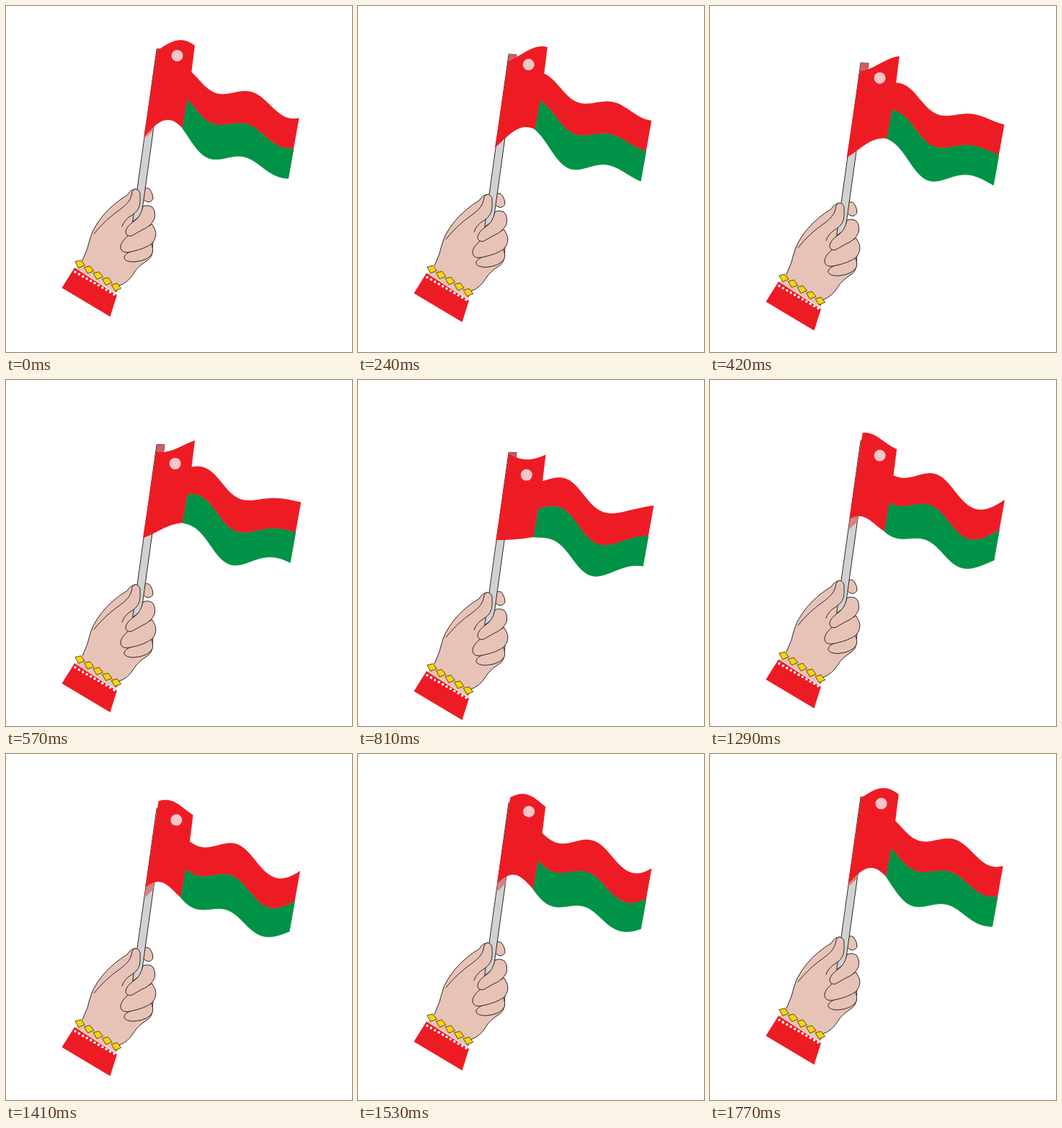
An HTML page that plays this animation: 480 by 480 pixels, repeating every 1.8 s.

```html
<!DOCTYPE html>
<html lang="en">
<head>
<meta charset="utf-8">
<title>Waving flag</title>
<style>
  html, body { margin: 0; width: 100%; height: 100%; overflow: hidden; background: #fff; }
  svg { display: block; width: 100vw; height: 100vh; }
  .line { stroke: #2e2623; stroke-width: 1; stroke-linejoin: round; stroke-linecap: round; }
  .skin { fill: #e7c3b7; }
  .red { fill: #ed1c24; }
</style>
</head>
<body>
<svg viewBox="0 0 480 480">
  <defs>
    <linearGradient id="tint" x1="0" y1="0" x2="0" y2="1">
      <stop offset="0" stop-color="#cf5b60"/>
      <stop offset="1" stop-color="#d98485"/>
    </linearGradient>
  </defs>
  <g id="scene">
    <path class="skin" d="M106 353L97 364L153 399L157 387Z"/>
    <path class="skin line" d="M106 353L113 336Q117 320 121 311Q132 290 151 274.500Q160 267 168 262.500Q173 254 180 254L186 262L190 290L205 310L203 340Q203 348 196 353Q183 361 177 371Q169 384 157 388L153 396"/>
    <path class="skin line" d="M190 255Q196 250 200 255Q204 261 204 267Q202 272 197 272Q193 271 190 268Z"/>
    <path class="line" fill="#d1d1d1" d="M209.500 59.5L220 60L188 290L176 299Z"/>
    <path fill="url(#tint)" d="M209.500 59.5L220 60L204.500 172L192 184Z"/>
    <path class="skin line" d="M161 306Q164 296 175 290Q186 283 186 271L186 260Q184 253 178 254Q174 257 174 263Q172 272 160 281Q138 296 122 316"/>
    <path class="skin line" d="M170 342Q163 346 164 350Q166 355 178 355Q198 353 203 343Q205 337 201 329Z"/>
    <path class="skin line" d="M169 319Q158 328 159 336Q161 344 173 341Q193 337 203 329Q210 320 207 311L203 303Z"/>
    <path class="skin line" d="M190 278Q197 275 203 279Q208 285 206 295Q201 306 188 311L174 319Q166 320 166 313Q167 306 177 299Q187 293 190 278Z"/>
    <path class="red" d="M95 363L154 401L144.500 431L77.500 391Z"/>
    <g id="beads" fill="#fff"></g>
    <g id="bracelet" fill="#fbd20b" stroke="#5e4a10" stroke-linejoin="round"></g>
    <path id="green" fill="#009247" stroke="#009247" stroke-width=".8"/>
    <path id="red" class="red"/>
    <circle id="badge" r="8" fill="#f9c6c8"/>
  </g>
</svg>
<script>
const LOOP = 1800, STEP = 30, TAU = 2 * Math.PI;
const get = id => document.getElementById(id);
const mix = (a, b, k) => a + (b - a) * k;
const hump = k => Math.sin(Math.PI * k);

let beads = '', links = '';
for (let i = 0; i < 11; i++)
  beads += `<circle cx="${96 + 5.4 * i}" cy="${369 + 3.1 * i}" r="1.8"/>`;
for (let i = 0; i < 5; i++)
  links += `<path transform="translate(${102.3 + 12.6 * i} ${357.7 + 8 * i})" d="M-6.500 -3L1.500 -5L7 2L-1.500 5.500Z"/>`;
get('beads').innerHTML = beads;
get('bracelet').innerHTML = links;

// Resting sag of each stripe edge right of the seam: height and skew
const SAG = [[11, 2.4], [11, 2.4], [13, 1.7], [15.7, 1]];

// Cloth point: u runs from -1/3 (pole) through 0 (seam) to 1 (fly end),
// v counts stripes from the top edge (0) to the bottom edge (3).
function cloth(u, v, t) {
  const left = u < 0;
  const k = left ? -3 * u : u;
  const seam = [261 - 4 * v - 0.6 * v * v, 60.5 + 36 * v + 0.7 * v * v];
  const end = left ? [209.8 - 6.1 * v, 60 + 39.9 * v] : [416 - 7.5 * v, 102 + 42 * v];
  const lag = 1200 + 2400 * u + (left ? 0 : 120 * hump(k ** 1.5));
  const wave = 11.2 * Math.cos(TAU * (t - lag) / LOOP);
  const [height, skew] = SAG[Math.round(v)];
  const sag = left ? -(2 + 2 * v) * hump(k) : height * hump(k ** skew);
  return [mix(seam[0], end[0], k) - 0.17 * wave, mix(seam[1], end[1], k) + wave + sag];
}

function edge(v, from, to, t) {
  const points = [];
  for (let i = 0; i <= 40; i++) points.push(cloth(mix(from, to, i / 40), v, t));
  return points;
}

const outline = (...edges) =>
  'M' + edges.flat().map(p => p.map(n => n.toFixed(2)).join(' ')).join('L') + 'Z';

function draw() {
  const t = Math.floor(performance.now() % LOOP / STEP) * STEP;
  const drop = 20.8 * (1 - Math.cos(TAU * (t + 10) / LOOP));
  get('scene').setAttribute('transform', `translate(0 ${drop.toFixed(2)})`);
  get('red').setAttribute('d', outline(
    edge(0, -1 / 3, 0, t), edge(1, 0, 1, t), edge(2, 1, 0, t), edge(3, 0, -1 / 3, t)));
  get('green').setAttribute('d', outline(edge(2, 0, 1, t), edge(3, 1, 0, t)));
  const [x, y] = cloth(-0.145, 0.6, t);
  get('badge').setAttribute('cx', x);
  get('badge').setAttribute('cy', y);
  requestAnimationFrame(draw);
}
draw();
</script>
</body>
</html>
```
